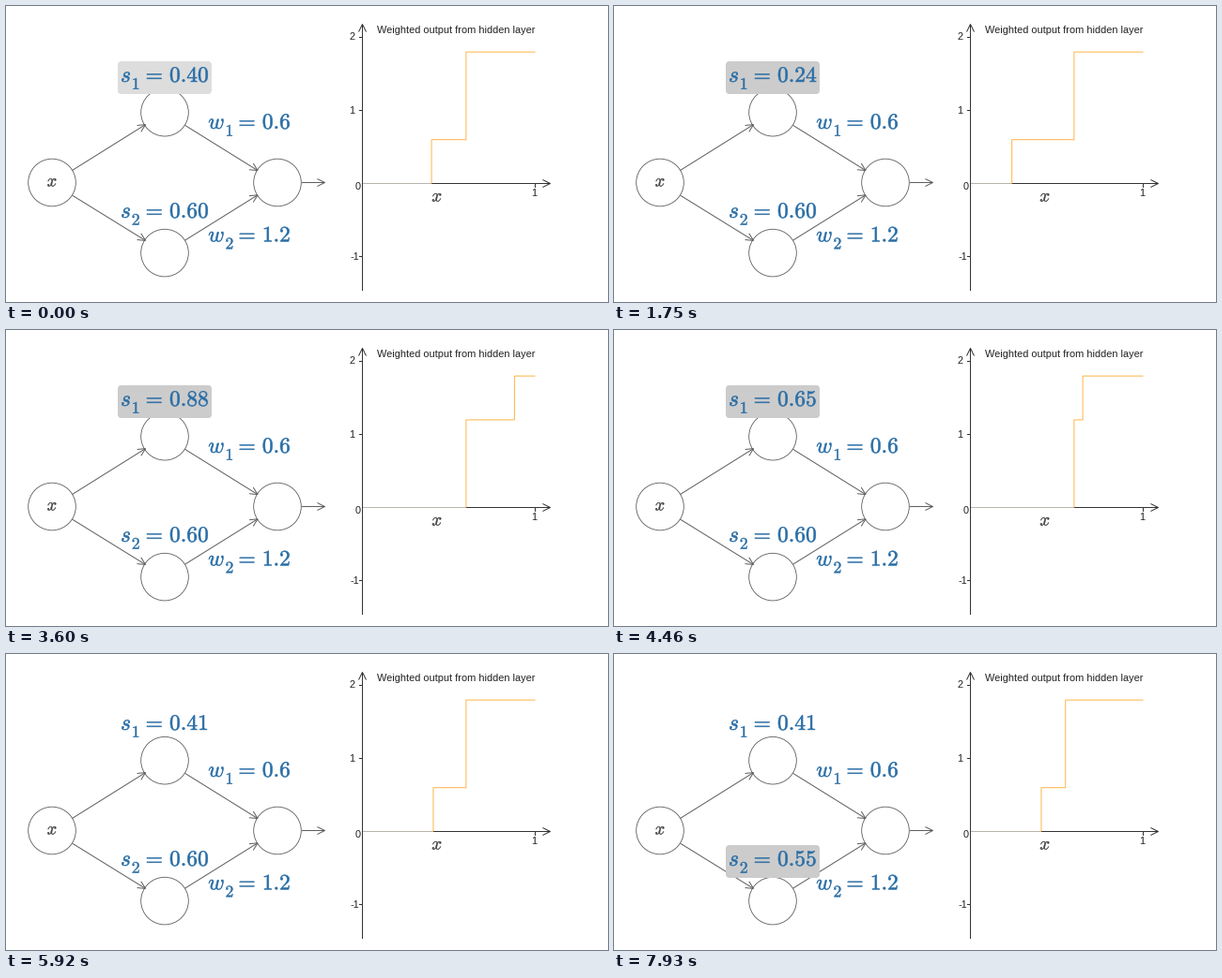
Animation, 641 px wide and 316 px high, one loop 8 s. Source, as a matplotlib script:

```python
import numpy as np
import matplotlib.pyplot as plt
from matplotlib.animation import FuncAnimation
from matplotlib.patches import Circle, FancyBboxPatch, PathPatch
from matplotlib.path import Path
from matplotlib.textpath import TextPath

WIDTH, HEIGHT, DPI = 641, 316, 64
PX = 72 / DPI                      # points per pixel
LOOP, STEP = 8000, 20
BLUE, INK, LINE, ORANGE = "#2a6ea6", "#333333", "#5e5e5e", "#ffb547"
HOVER, PRESSED = "#dddddd", "#cccccc"
EM = 23.5
LABEL_X, EQUALS_DX = 122, 27.2
VALUE_DX = 1.056 * EM              # from the equals sign to the number
W1, W2 = 0.6, 1.2

# Drags: (start ms, end ms, values in hundredths)
DRAGS_1 = [
    (980, 1750, [39, 38, 37, 35, 33, 31, 29, 27, 26, 25, 24]),
    (2210, 3000, [26, 30, 35, 40, 45, 50, 55, 59, 63, 66, 68]),
    (3080, 3600, [70, 73, 76, 79, 82, 85, 87, 88]),
    (4150, 4830, [86, 82, 77, 71, 65, 59, 53, 49, 46, 44]),
    (5230, 5690, [43, 42, 41]),
]
DRAGS_2 = [
    (6460, 7230, [59, 57, 55, 52, 47, 41, 35, 29, 23, 19, 17]),
    (7780, 7930, [28, 42, 55]),
]
# Highlight colours of the two labels from each time on
HIGHLIGHTS = [
    (0, HOVER, None), (610, PRESSED, None), (5840, HOVER, None),
    (5920, None, None), (6150, None, HOVER), (6460, None, PRESSED),
]

plt.rcParams["mathtext.fontset"] = "cm"
plt.rcParams["toolbar"] = "None"
fig = plt.figure(figsize=(WIDTH / DPI, HEIGHT / DPI), dpi=DPI, facecolor="white")
ax = fig.add_axes([0, 0, 1, 1])
ax.set_xlim(0, WIDTH)
ax.set_ylim(HEIGHT, 0)
ax.axis("off")


def value_at(t, start, drags):
    value = start
    for begin, end, values in drags:
        times = np.round(np.linspace(begin, end, len(values)), -1)
        passed = np.searchsorted(times, t, side="right")
        if passed:
            value = values[passed - 1]
    return value / 100


def glyph_path(text, x, y, size):
    outline = TextPath((0, 0), f"${text}$", size=size)
    return Path(outline.vertices * [1, -1] + [x, y], outline.codes)


def glyphs(text, x, y, size=EM, color=BLUE, weight=0.55):
    patch = PathPatch(glyph_path(text, x, y, size), facecolor=color,
                      edgecolor=color, lw=weight * PX, zorder=4)
    return ax.add_patch(patch)


def line(xs, ys, color=LINE, **kw):
    return ax.plot(xs, ys, color=color, lw=PX, snap=False,
                   solid_capstyle="butt", solid_joinstyle="miter", **kw)[0]


def arrow(x0, y0, x1, y1, color=LINE, head=9, spread=0.46):
    line([x0, x1], [y0, y1], color)
    back = np.arctan2(y0 - y1, x0 - x1)
    angles = back + np.array([-spread, spread])
    xs, ys = x1 + head * np.cos(angles), y1 + head * np.sin(angles)
    line([xs[0], x1, xs[1]], [ys[0], y1, ys[1]], color)


def label(name, index, value, x, y, sub_dx, equals_dx):
    glyphs(name, x, y)
    glyphs(index, x + sub_dx, y + 7.8, EM * 0.75, weight=0.45)
    # mathtext pads the sign by 0.2 em on its left
    glyphs("=", x + equals_dx - 0.2 * EM, y)
    return glyphs(value, x + equals_dx + VALUE_DX, y)


def highlight(y):
    box = FancyBboxPatch((119, y), 100, 35, lw=0, zorder=3,
                         boxstyle="round,pad=0,rounding_size=4")
    return ax.add_patch(box)


def plain(text, x, y, align="center"):
    ax.text(x, y, text, family="Liberation Sans", fontsize=11 * PX,
            color="#222222", ha=align, va="baseline")


def plot_x(s):
    return 379.5 + 184 * s


def plot_y(v):
    return 189.5 - 78 * v


# Network
for cx, cy in [(49, 188.5), (169, 113.7), (169, 263.6), (289, 188.5)]:
    ax.add_patch(Circle((cx, cy), 25.3, fill=False, ec=LINE, lw=0.85 * PX))
arrow(70.5, 175.5, 148.5, 126.6)
arrow(70.5, 202.1, 148.5, 250.4)
arrow(190.5, 127.3, 268, 175.6)
arrow(190.5, 250.2, 268, 201.8)
arrow(315, 188.5, 339.5, 188.5)
glyphs("x", 43.6, 192.5, 18.5, "#444444", 0.4)
boxes = [highlight(59), highlight(204)]
digits = [label("s", "1", "0.40", LABEL_X, 81, 11.8, EQUALS_DX),
          label("s", "2", "0.60", LABEL_X, 226, 11.8, EQUALS_DX)]
label("w", "1", "0.6", 215.3, 131, 18.2, 32.7)
label("w", "2", "1.2", 215.3, 251.5, 18.2, 32.7)

# Graph
arrow(379.5, 304, 379.5, 19.5, INK)
arrow(379.5, 189.5, 579.5, 189.5, INK)
for v in (2, 1, -1):
    line([376, 380], [np.floor(plot_y(v)) + 0.5] * 2, INK)
line([563.5, 563.5], [189.5, 194], INK)
plain("2", 368, 36)
plain("1", 368, 115)
plain("-1", 371, 271)
plain("0", 375, 196)
plain("1", 562.5, 203)
plain("Weighted output from hidden layer", 395, 29, "left")
glyphs("x", 453.3, 208.6, 19, "#444444", 0.4)
base = line([], [], "#b9b4ad", zorder=3)
curve = line([], [], ORANGE, zorder=3)


def draw(i):
    t = i * STEP + STEP / 2
    s = [value_at(t, 40, DRAGS_1), value_at(t, 60, DRAGS_2)]
    colors = [state for state in HIGHLIGHTS if state[0] <= t][-1][1:]
    for box, color in zip(boxes, colors):
        box.set_visible(color is not None)
        box.set_facecolor(color or HOVER)
    for patch, value, y in zip(digits, s, (81, 226)):
        x = LABEL_X + EQUALS_DX + VALUE_DX
        patch.set_path(glyph_path(f"{value:.2f}", x, y, EM))

    (first, weight), (second, _) = sorted(zip(s, (W1, W2)))
    a, b = plot_x(first), plot_x(second)
    mid, top = plot_y(weight), plot_y(W1 + W2)
    base.set_data([380, a], [189.5, 189.5])
    curve.set_data([a, a, b, b, plot_x(1)], [189.5, mid, mid, top, top])
    return [*boxes, *digits, base, curve]


anim = FuncAnimation(fig, draw, frames=LOOP // STEP, interval=STEP,
                     repeat=True, repeat_delay=0)
plt.show()
```
